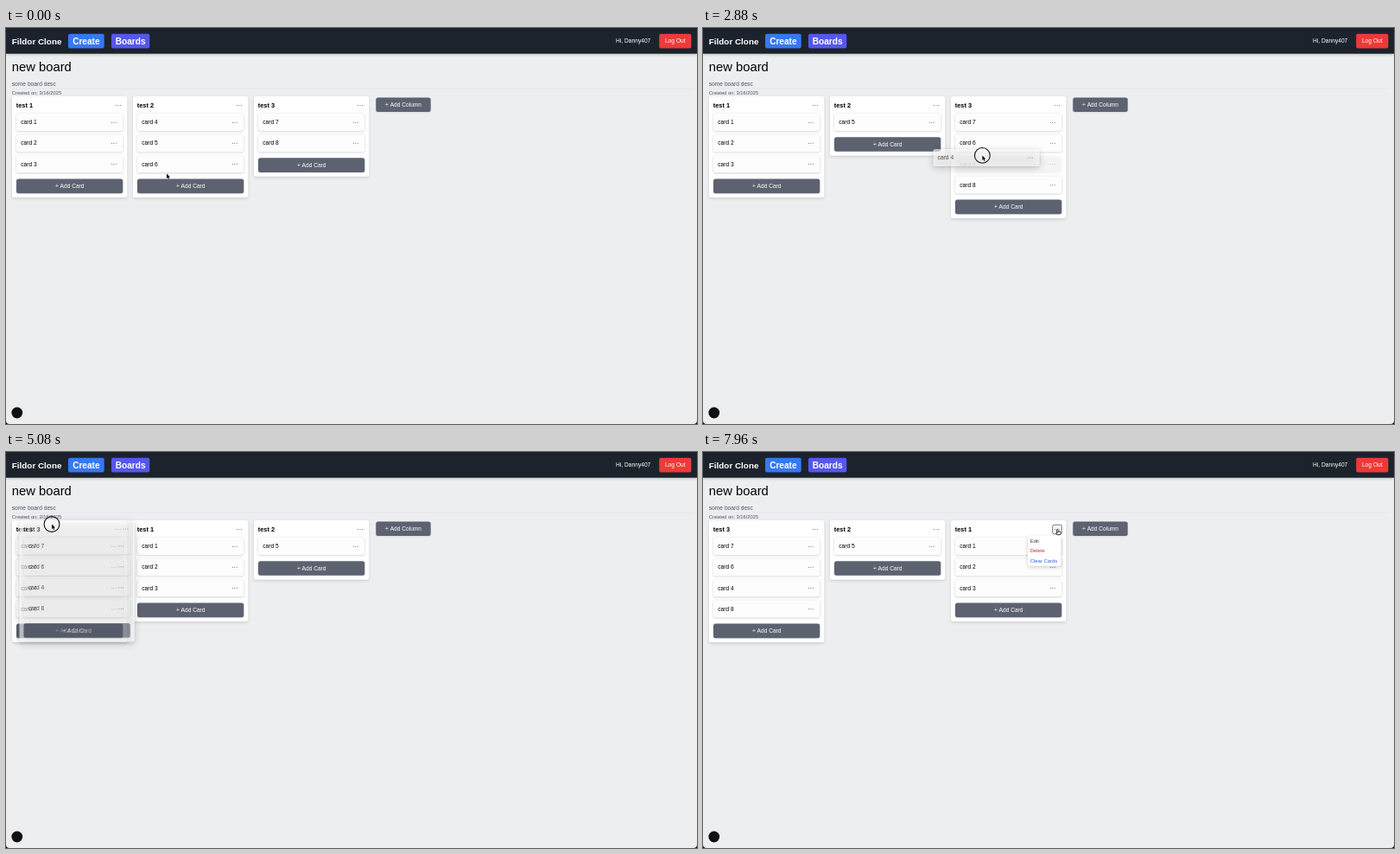
Animation of 800 by 458 pixels, one loop 8000 ms. Source, as an HTML page with a canvas:

```html
<!DOCTYPE html>
<html lang="en">
<head>
<meta charset="utf-8">
<title>Board</title>
<style>
html, body { margin: 0; width: 800px; height: 458px; overflow: hidden; background: #edeef0; }
canvas { display: block; }
</style>
</head>
<body>
<canvas id="stage" width="800" height="458"></canvas>
<script>
const LOOP = 8000, STEP = 24.15, TOP = 79, CARD_W = 123.3, COLUMN_W = 133.3;
const FONT = '"Liberation Sans", Arial, sans-serif';
const screen = document.getElementById('stage').getContext('2d');
const layer = document.createElement('canvas');
layer.width = 800;
layer.height = 458;
const layerCtx = layer.getContext('2d');
let ctx = screen;

const within = (t, a, b) => t >= a && t < b;
const lerp = (a, b, k) => a + (b - a) * k;
const clamp = k => Math.max(0, Math.min(1, k));
const smooth = k => k * k * (3 - 2 * k);
const easeOut = k => k * (2 - k);

// Each column is written as its number followed by its cards.
const layouts = [
  [0, '1123 2456 378'],
  [880, '1123 245 3786'],
  [1160, '1123 245 3768'],
  [2660, '1123 25 37648'],
  [4620, '1123 37648 25'],
  [4820, '37648 1123 25'],
  [6360, '37648 25 1123']
].map(([at, text]) => ({ at, columns: text.split(' ') }));

// Pointer moves; those with a card or a column drag it along.
const start = { x: 186, y: 168.5 };
const moves = [
  { from: 40, to: 440, x: 188, y: 159.5 },
  { from: 600, to: 1370, x: 328, y: 128.3, card: '6' },
  { from: 1720, to: 2500, x: 209, y: 106.5 },
  { from: 2560, to: 3080, x: 343, y: 154.4, card: '4' },
  { from: 3400, to: 4180, x: 324.5, y: 84 },
  { from: 4220, to: 5080, x: 53, y: 83.5, column: '3' },
  { from: 5300, to: 5880, x: 197, y: 82 },
  { from: 5920, to: 6720, x: 339, y: 93.3, column: '1' },
  { from: 7120, to: 7900, x: 410, y: 89.3 }
];
const drags = moves.filter(m => m.card || m.column);
for (const drag of drags) {
  drag.press = drag.from - 50;
  drag.lift = drag.from + 80;
  drag.release = drag.to + 20;
  drag.end = drag.release + 180;
}

function pointer(t) {
  let { x, y } = start;
  for (const move of moves) {
    const k = (move.card ? easeOut : smooth)(clamp((t - move.from) / (move.to - move.from)));
    x = lerp(x, move.x, k);
    y = lerp(y, move.y, k);
  }
  return { x, y };
}

function place(layout) {
  const columns = {}, cards = {};
  layout.columns.forEach((text, slot) => {
    const id = text[0], list = [...text.slice(1)];
    columns[id] = { x: 7 + 140 * slot, y: TOP, count: list.length };
    list.forEach((name, row) => {
      cards[name] = { column: id, dx: 5, dy: 20 + STEP * row };
    });
  });
  return { columns, cards };
}

function board(t) {
  const i = layouts.findLastIndex(layout => layout.at <= t);
  const now = place(layouts[i]), before = place(layouts[Math.max(0, i - 1)]);
  const k = smooth(clamp((t - layouts[i].at) / 200));
  for (const id in now.columns) {
    now.columns[id].x = lerp(before.columns[id].x, now.columns[id].x, k);
  }
  for (const name in now.cards) {
    const card = now.cards[name], old = before.cards[name];
    if (card.column === old.column) card.dy = lerp(old.dy, card.dy, k);
  }
  return now;
}

function box(x, y, w, h, r, fill) {
  ctx.beginPath();
  ctx.roundRect(x, y, w, h, r);
  ctx.fillStyle = fill;
  ctx.fill();
}

function disc(x, y, r, fill) {
  ctx.beginPath();
  ctx.arc(x, y, r, 0, 7);
  ctx.fillStyle = fill;
  ctx.fill();
}

function stroke(color, width) {
  ctx.strokeStyle = color;
  ctx.lineWidth = width;
  ctx.stroke();
}

// Paints only the shadow: the shape that casts it lies off the stage.
function shadow(x, y, w, h, r, dy, blur, alpha) {
  ctx.save();
  ctx.shadowColor = `rgba(0,0,0,${alpha})`;
  ctx.shadowBlur = blur;
  ctx.shadowOffsetX = 2000;
  ctx.shadowOffsetY = dy;
  box(x - 2000, y, w, h, r, '#000');
  ctx.restore();
}

function label(text, x, y, size, color = '#000', weight = 400, align = 'left') {
  ctx.font = `${weight} ${size}px ${FONT}`;
  ctx.textAlign = align;
  ctx.fillStyle = color;
  ctx.fillText(text, x, y);
}

function dots(x, y) {
  for (let i = -1; i < 2; i++) disc(x + i * 2.4, y, 0.52, '#4b5563');
}

function button(text, x, y, w) {
  shadow(x, y, w, 16.7, 2.5, 0.6, 1.5, 0.12);
  box(x, y, w, 16.7, 2.5, '#5d6271');
  label(text, x + w / 2, y + 10.6, 6.6, '#fff', 400, 'center');
}

function navButton(text, x, w, size, weight, fill) {
  box(x, 6.8, w, 16.7, 2, fill);
  label(text, x + w / 2, 15.1 + size * 0.35, size, '#fff', weight, 'center');
}

function drawCard(name, x, y, alpha = 1) {
  ctx.save();
  ctx.globalAlpha = alpha;
  shadow(x, y, CARD_W, 20, 2.5, 0.6, 2.5, 0.22);
  box(x, y, CARD_W, 20, 2.5, '#fdfdfd');
  label('card ' + name, x + 5.2, y + 12.3, 6.7);
  dots(x + 112.8, y + 10.2);
  ctx.restore();
}

const columnHeight = count => 44.5 + STEP * count;

function drawColumn(id, state, x, y, held) {
  const { count } = state.columns[id], h = columnHeight(count);
  shadow(x, y, COLUMN_W, h, 2.5, 1.3, 3.5, 0.14);
  box(x, y, COLUMN_W, h, 2.5, '#fff');
  label('test ' + id, x + 4.8, y + 13.2, 7.4, '#000', 700);
  dots(x + 123, y + 10.6);
  for (const name in state.cards) {
    const card = state.cards[name];
    if (card.column === id) drawCard(name, x + card.dx, y + card.dy, name === held ? 0.3 : 1);
  }
  button('+ Add Card', x + 5, y + 23 + STEP * count, CARD_W);
}

function position(drag, state) {
  if (drag.column) return state.columns[drag.column];
  const card = state.cards[drag.card], column = state.columns[card.column];
  return { x: column.x + card.dx, y: column.y + card.dy };
}

function drawGhost(drag, state, t) {
  const home = position(drag, board(drag.from)), goal = position(drag, state);
  const from = pointer(drag.from), to = pointer(t);
  const k = smooth(clamp((t - drag.release) / (drag.end - drag.release)));
  const x = lerp(home.x + to.x - from.x, goal.x, k);
  const y = lerp(home.y + to.y - from.y, goal.y, k);
  const [w, h] = drag.column
    ? [COLUMN_W, columnHeight(state.columns[drag.column].count)]
    : [CARD_W, 20];
  shadow(x, y, w, h, 3, 2.5, 9, 0.17);
  ctx = layerCtx;
  ctx.clearRect(0, 0, 800, 458);
  if (drag.column) drawColumn(drag.column, state, x, y);
  else drawCard(drag.card, x, y);
  ctx = screen;
  ctx.globalAlpha = 0.6;
  ctx.drawImage(layer, 0, 0);
  ctx.globalAlpha = 1;
}

function drawPage() {
  ctx.fillStyle = '#000';
  ctx.fillRect(0, 0, 800, 458);
  box(0, 0, 800, 458, [0, 0, 4, 4], '#edeef0');
  shadow(0, 0, 800, 29.7, 0, 1, 3, 0.2);
  box(0, 0, 800, 29.7, 0, '#1c232d');
  label('Fildor Clone', 6.8, 18.6, 9.9, '#fff', 700);
  navButton('Create', 72, 41.7, 10.1, 700, '#3679ef');
  navButton('Boards', 122, 44.3, 10.1, 700, '#5558eb');
  navButton('Log Out', 756.2, 37.2, 6.7, 400, '#ed3a37');
  label('Hi, Danny407', 746.3, 17.4, 6.65, '#fff', 400, 'right');
  label('new board', 6.7, 50.2, 14.8);
  label('some board desc', 6.8, 67.3, 6.65, '#4b5563');
  ctx.fillStyle = '#dfe1e5';
  ctx.fillRect(6.7, 69.7, 786.6, 0.7);
  label('Created on: 3/16/2025', 6.8, 76.7, 5.78, '#4b5563');
  button('+ Add Column', 428.3, 80.4, 63.4);
  disc(12.8, 445, 6.4, '#111');
}

function drawMenu() {
  box(404.7, 84.2, 10.6, 10.6, 2, '#f5f5f6');
  stroke('#555a63', 0.8);
  dots(410, 89.6);
  shadow(376, 96.8, 38.3, 35, 2, 1.5, 4, 0.2);
  box(376, 96.8, 38.3, 35, 2, '#fff');
  const entries = [['Edit', '#374151'], ['Delete', '#d92626'], ['Clear Cards', '#2860dc']];
  entries.forEach(([text, color], i) => label(text, 378.7, 104.6 + 11.7 * i, 5.9, color));
}

function drawArrow() {
  const arrow = new Path2D('M0 0V5.6L1.3 4.4L2.2 6.5L3.2 6.1L2.3 4.1H4Z');
  ctx.lineJoin = 'round';
  ctx.lineWidth = 0.9;
  ctx.strokeStyle = '#fff';
  ctx.stroke(arrow);
  ctx.fillStyle = '#000';
  ctx.fill(arrow);
}

function drawHand() {
  box(-0.8, 2.6, 5, 3.8, 1.4, '#fff');
  stroke('#111', 0.9);
  box(-0.4, 0, 1.4, 4.4, 0.7, '#fff');
  stroke('#111', 0.7);
}

function drawPointer(t) {
  const { x, y } = pointer(t);
  if (drags.some(drag => within(t, drag.press, drag.release))) {
    disc(x, y, 8.9, 'rgba(255,255,255,.15)');
    stroke('#111', 1.1);
  }
  ctx.save();
  ctx.translate(x, y);
  if (t > 7820) drawHand();
  else drawArrow();
  ctx.restore();
}

function draw(t) {
  const state = board(t);
  const drag = drags.find(d => within(t, d.lift, d.end));
  drawPage();
  for (const id in state.columns) {
    const { x, y } = state.columns[id];
    drawColumn(id, state, x, y, drag && drag.card);
  }
  if (drag) drawGhost(drag, state, t);
  if (t >= 7940) drawMenu();
  drawPointer(t);
}

const began = performance.now();
function tick() {
  draw((performance.now() - began) % LOOP);
  requestAnimationFrame(tick);
}
tick();
</script>
</body>
</html>
```
